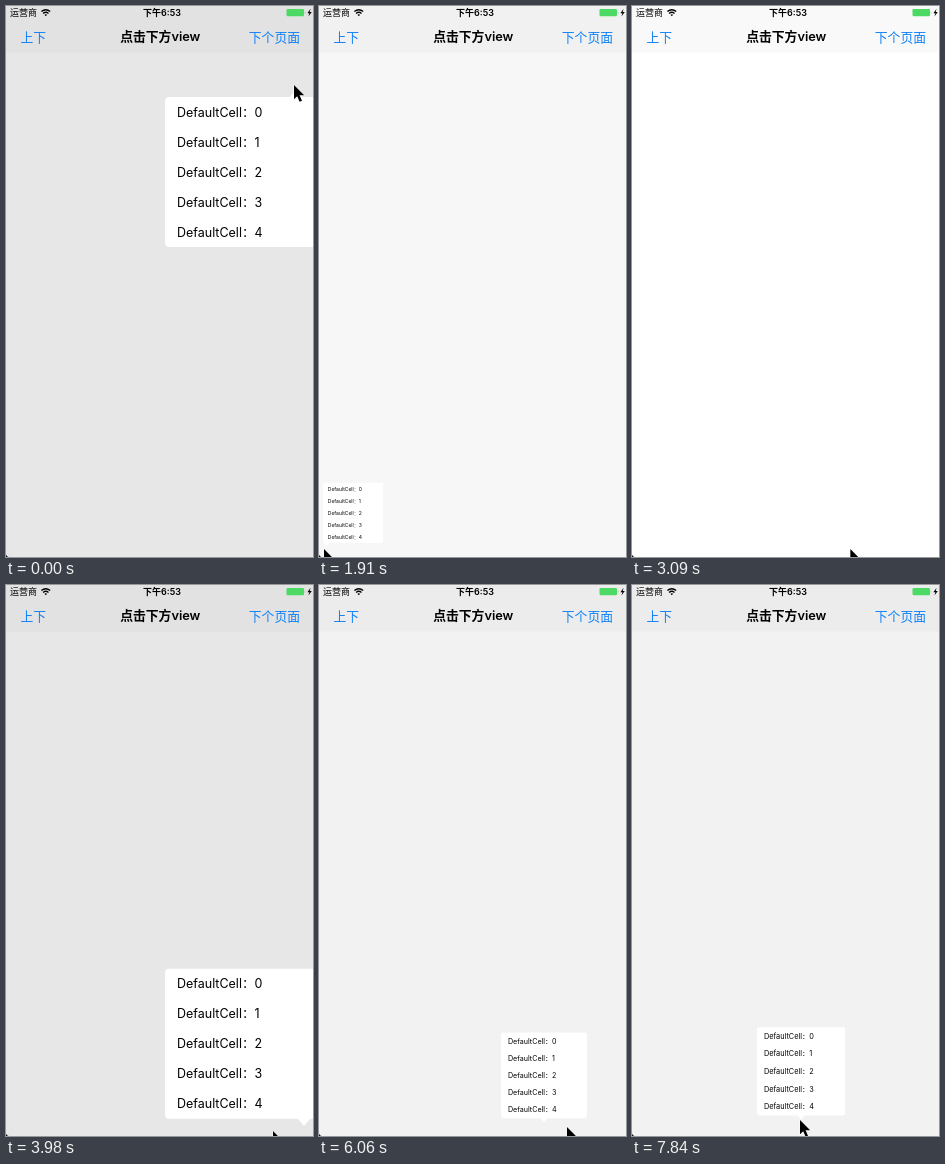
Write an HTML page that moves like this. It is 307 by 551 pixels and loops after 7.99 s.

```html
<!DOCTYPE html>
<html lang="zh-CN">
<head>
<meta charset="utf-8">
<title>Popup menu</title>
<style>
html, body { margin: 0; width: 100%; height: 100%; overflow: hidden; background: #fff; }
svg { display: block; width: 307px; height: 551px; }
text { font-family: Inter, "Noto Sans CJK SC", "Noto Sans CJK", sans-serif; fill: #000; }
.status { font-size: 9px; }
.nav { font-size: 12.8px; }
.bold { font-weight: 600; text-anchor: middle; }
.link { fill: #0f80f8; }
.cell { font-size: 12.5px; }
</style>
</head>
<body>
<svg viewBox="0 0 307 551">
  <rect width="307" height="551" fill="#fff"/>
  <rect width="307" height="46.5" fill="#f9f9f9"/>
  <rect id="dim" width="307" height="551" opacity="0"/>

  <text class="status" x="4" y="10.2">运营商</text>
  <g fill="none" stroke="#000" stroke-width="1.3">
    <path d="M35.4 5.6Q39.8 1.8 44.2 5.6M37.1 7.4Q39.8 5 42.5 7.4"/>
    <path d="M39.8 10.2L38.5 8.7Q39.8 7.7 41.1 8.7Z" fill="#000" stroke="none"/>
  </g>
  <text class="status bold" x="156" y="10.2">下午6:53</text>
  <rect x="280.5" y="3" width="17.5" height="7.2" rx="1.2" fill="#4cd964"/>
  <path d="M298.8 5.2Q300.2 6.6 298.8 8Z" fill="#4cd964"/>
  <path d="M304.6 2.8L301.4 7.2H303.4L302.4 10.6L305.8 6H303.7Z"/>

  <text class="nav link" x="14.5" y="35.6">上下</text>
  <text class="nav bold" x="154.3" y="35.4">点击下方view</text>
  <text class="nav link" x="242.8" y="35.6">下个页面</text>

  <g id="menu" display="none">
    <rect width="150" height="150" rx="4" fill="#fff"/>
    <path id="arrow" fill="#fff"/>
    <g id="cells"></g>
  </g>
  <path d="M0 548.5Q.4 550.6 2.6 551H0Z"/>
  <path id="cursor" d="M0 0V14.2L3.2 11.2L5.6 16.8L8 15.8L5.6 10.3H10.2Z"
    stroke="#fff" stroke-width="1" paint-order="stroke" stroke-linejoin="round"/>
</svg>
<script>
const LOOP = 7990, TICK = 148, FADE = 250, ROW = 30;
const byId = id => document.getElementById(id);
const [dim, menu, arrow, cells, cursor] =
  ['dim', 'menu', 'arrow', 'cells', 'cursor'].map(byId);

// Each menu grows from its anchor point; left and top place it at full size.
const popups = [
  { open: -999, close: 1200, ax: 290, ay: 88, left: 159, top: 91, up: true },
  { open: 1811, close: 2727, ax: 7.7, ay: 537.5, left: -1.5, top: 386.3 },
  { open: 3440, close: 4450, ax: 298, ay: 535, left: 159, top: 383.7 },
  { open: 5200, close: 5931, ax: 225, ay: 533.5, left: 150, top: 383 },
  { open: 6418, close: 7245, ax: 273, ay: 534.5, left: 159, top: 384 },
  { open: 7696, close: 9999, ax: 169, ay: 531, left: 94, top: 380 },
];

// time, x, y of the pointer tip
const path = [
  [0, 288, 79], [130, 288, 79], [1160, 30, 435], [1600, 5, 543], [2060, 5, 543],
  [2790, 141, 545], [3400, 298, 541], [3680, 298, 541], [3980, 267, 546],
  [4270, 232, 543], [4440, 232, 543], [5150, 225, 538], [5640, 225, 538],
  [6060, 248, 542], [6400, 273, 541], [6810, 273, 541], [6940, 284, 541],
  [7380, 284, 541], [7670, 168, 535], [7990, 168, 535],
];

for (let i = 0; i < 5; i++) {
  const cell = document.createElementNS('http://www.w3.org/2000/svg', 'text');
  cell.setAttribute('class', 'cell');
  cell.setAttribute('x', 12);
  cell.setAttribute('y', ROW * i + 19.6);
  cell.textContent = `DefaultCell：${i}`;
  cells.append(cell);
}

const clamp = v => Math.min(1, Math.max(0, v));
const ease = v => v * v * (3 - 2 * v);
const shown = (p, t) =>
  ease(clamp((t - p.open) / FADE)) - ease(clamp((t - p.close) / FADE));

function pointerAt(t) {
  const i = Math.max(1, path.findIndex(k => k[0] >= t));
  const [t0, x0, y0] = path[i - 1], [t1, x1, y1] = path[i];
  const u = ease(clamp((t - t0) / (t1 - t0)));
  return [x0 + (x1 - x0) * u, y0 + (y1 - y0) * u];
}

function drawMenu(t) {
  const p = popups.find(q => shown(q, t) > 0);
  menu.setAttribute('display', p ? 'inline' : 'none');
  const amount = p ? shown(p, t) : 0;
  dim.setAttribute('opacity', amount * 0.095);
  if (!p) return;
  const s = 0.1 + 0.9 * amount;
  const x = p.ax + (p.left - p.ax) * s, y = p.ay + (p.top - p.ay) * s;
  menu.setAttribute('transform', `translate(${x} ${y}) scale(${s})`);
  const [base, tip] = p.up ? [0.5, -7.5] : [149.5, 157.5];
  const mid = p.ax - p.left;
  arrow.setAttribute('d', `M${mid - 6.5} ${base}H${mid + 6.5}L${mid} ${tip}Z`);
}

function render(now) {
  // The picture advances in steps, like a low frame rate screen capture.
  const t = Math.floor((now % LOOP + 24) / TICK) * TICK - 16;
  drawMenu(t);
  cursor.setAttribute('transform', `translate(${pointerAt(t)})`);
}

const start = performance.now();
function loop() {
  render(performance.now() - start);
  requestAnimationFrame(loop);
}
loop();
</script>
</body>
</html>
```
